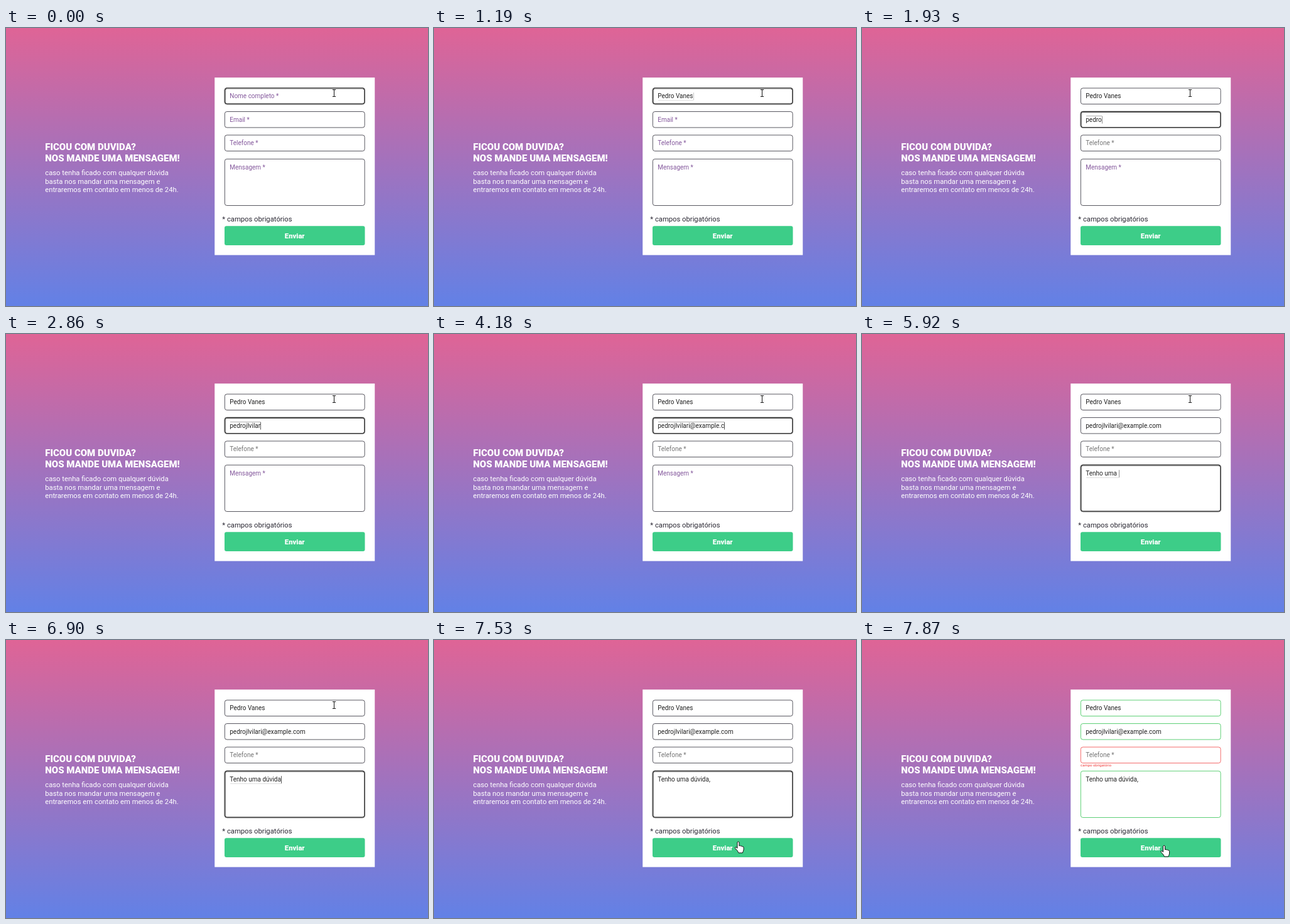
An HTML page for the animation above (8000 ms loop, 672x444 px).

```html
<!DOCTYPE html>
<html lang="pt-BR">
<head>
<meta charset="utf-8">
<title>Formulário de contato</title>
<style>
  html, body { margin: 0; width: 672px; height: 444px; overflow: hidden; }
  body { position: relative; background: linear-gradient(#df6496, #6281e6); }
  body * { position: absolute; box-sizing: border-box; white-space: pre; margin: 0; }
  /* the page is laid out at 896 x 592 and shown at three quarters */
  .page {
    left: 0; top: 0; width: 896px; height: 592px;
    transform: translateY(.4px) scale(.75); transform-origin: 0 0;
    font: 15px/18px Roboto, sans-serif; color: #fff;
  }
  h1 { left: 83px; top: 240px; font: 900 20px/24px Roboto, sans-serif; }
  .intro { left: 83px; top: 299px; }
  .card { left: 443px; top: 105px; width: 340px; height: 378px; background: #fff; }
  .field {
    left: 464px; width: 298px; height: 35px;
    border: 1px solid #22202c; border-radius: 5px;
    font-size: 13.333px; line-height: 16px; color: #222;
  }
  .field span { left: 10px; top: 9px; height: 16px; }
  .area { height: 100px; }
  .area span { top: 10px; }
  .focus { border-color: #111; box-shadow: 0 0 0 .5px #111, inset 0 0 0 1px #111; }
  .empty { color: #84589c; }
  .empty.dim { color: #757575; }
  .caret { box-shadow: 1px 0 #222; }
  .valid { border-color: #28c048; }
  .invalid { border-color: #f03a3a; }
  .note { left: 459px; top: 397px; color: #2a2833; }
  .error { left: 464px; top: 262px; font-size: 8px; line-height: 10px; color: #f03a3a; }
  .send {
    left: 464px; top: 421px; width: 298px; height: 41px; border-radius: 4px;
    background: #3dcd88; font-weight: 900; line-height: 42px; text-align: center;
  }
  svg { left: 0; top: 0; overflow: visible; }
</style>
</head>
<body>
<div class="page">
<h1>FICOU COM DUVIDA?
NOS MANDE UMA MENSAGEM!</h1>
<p class="intro">caso tenha ficado com qualquer dúvida
basta nos mandar uma mensagem e
entraremos em contato em menos de 24h.</p>
<div class="card"></div>
<p class="note">* campos obrigatórios</p>
<div class="send">Enviar</div>
<p class="error">campo obrigatório</p>
</div>
<svg width="1" height="1" fill="#fff" stroke="#111" stroke-linejoin="round">
  <path id="beam" fill="none" d="M-2.5-5.5h2q.5 0 .5 .5q0-.5 .5-.5h2M0-5V5M-2.5 5.5h2q.5 0 .5-.5q0 .5 .5 .5h2"/>
  <path id="arrow" d="M0 0V14L3.3 11L5.5 16L8 15L5.8 10H10Z"/>
  <path id="hand" d="M-1.5 1Q0-1 1.5 1V7Q3 5.5 4.2 7.2Q5.6 6.2 6.6 8Q8.4 7.4 8.6 9.5V13Q8 15.5 6.8 18H.5Q-.5 16-1 15L-5 10.5Q-5.3 8.5-3.4 8.9L-1.5 10.5Z"/>
</svg>
<script>
const LOOP = 8000, SUBMIT = 7730;

// n evenly spaced times from a to b
const steps = (a, b, n) => Array.from({ length: n }, (_, i) => a + (b - a) * i / (n - 1));

const fields = [
  { hint: 'Nome completo *', text: 'Pedro Vanes', top: 127, focus: [0, 1260],
    keys: [...steps(70, 860, 8), 990, 1060, 1190] },
  { hint: 'Email *', text: 'pedrojlvilari@example.com', top: 177, focus: [1260, 4550],
    keys: [1330, ...steps(1530, 1730, 3), 1930, 2060, ...steps(2210, 2990, 7),
      ...steps(3060, 3390, 4), ...steps(3590, 4180, 6), 4310, 4440] },
  { hint: 'Telefone *', text: '', top: 227, focus: [4550, 4660], keys: [], dimAt: 1330 },
  { hint: 'Mensagem *', text: 'Tenho uma dúvida,', top: 278, area: true, focus: [4660, SUBMIT],
    keys: [...steps(4770, 5100, 4), ...steps(5370, 5570, 3), ...steps(5720, 5920, 3),
      6180, ...steps(6380, 6900, 5), 7100] }
];

const pick = selector => document.querySelector(selector);

for (const f of fields) {
  f.box = pick('.page').appendChild(document.createElement('div'));
  f.box.style.top = f.top + 'px';
  f.label = f.box.appendChild(document.createElement('span'));
}

// pointer hot spot: time, x, y
const path = [[7200, 522.5, 104], [7330, 514, 185], [7430, 497, 280],
  [7530, 484.5, 322], [7600, 484.5, 322], [7700, 481, 328]];

function pointer(t) {
  const i = path.findIndex(p => p[0] > t);
  if (i === 0) return path[0].slice(1);
  if (i < 0) return path.at(-1).slice(1);
  const [a, b] = [path[i - 1], path[i]], k = (t - a[0]) / (b[0] - a[0]);
  return [1, 2].map(j => a[j] + (b[j] - a[j]) * k);
}

function draw(t) {
  const sent = t >= SUBMIT;
  for (const f of fields) {
    const count = f.keys.filter(k => k <= t).length;
    const focused = t >= f.focus[0] && t < f.focus[1];
    f.label.textContent = count ? f.text.slice(0, count) : f.hint;
    f.label.className = count ? (focused && t < 7500 ? 'caret' : '')
      : 'empty' + (t >= f.dimAt ? ' dim' : '');
    f.box.className = 'field' + (f.area ? ' area' : '') + (focused ? ' focus' : '')
      + (sent ? (f.text ? ' valid' : ' invalid') : '');
  }
  pick('.error').hidden = !sent;

  const [x, y] = pointer(t), pageY = y / .75;
  const overField = fields.some(f => pageY >= f.top && pageY < f.top + (f.area ? 100 : 35));
  const shape = y >= 316 ? 'hand' : overField ? 'beam' : 'arrow';
  for (const id of ['beam', 'arrow', 'hand']) {
    pick('#' + id).style.display = id === shape ? '' : 'none';
    pick('#' + id).setAttribute('transform', `translate(${x} ${y})`);
  }
}

function tick() {
  draw(performance.now() % LOOP);
  requestAnimationFrame(tick);
}
tick();
</script>
</body>
</html>
```
